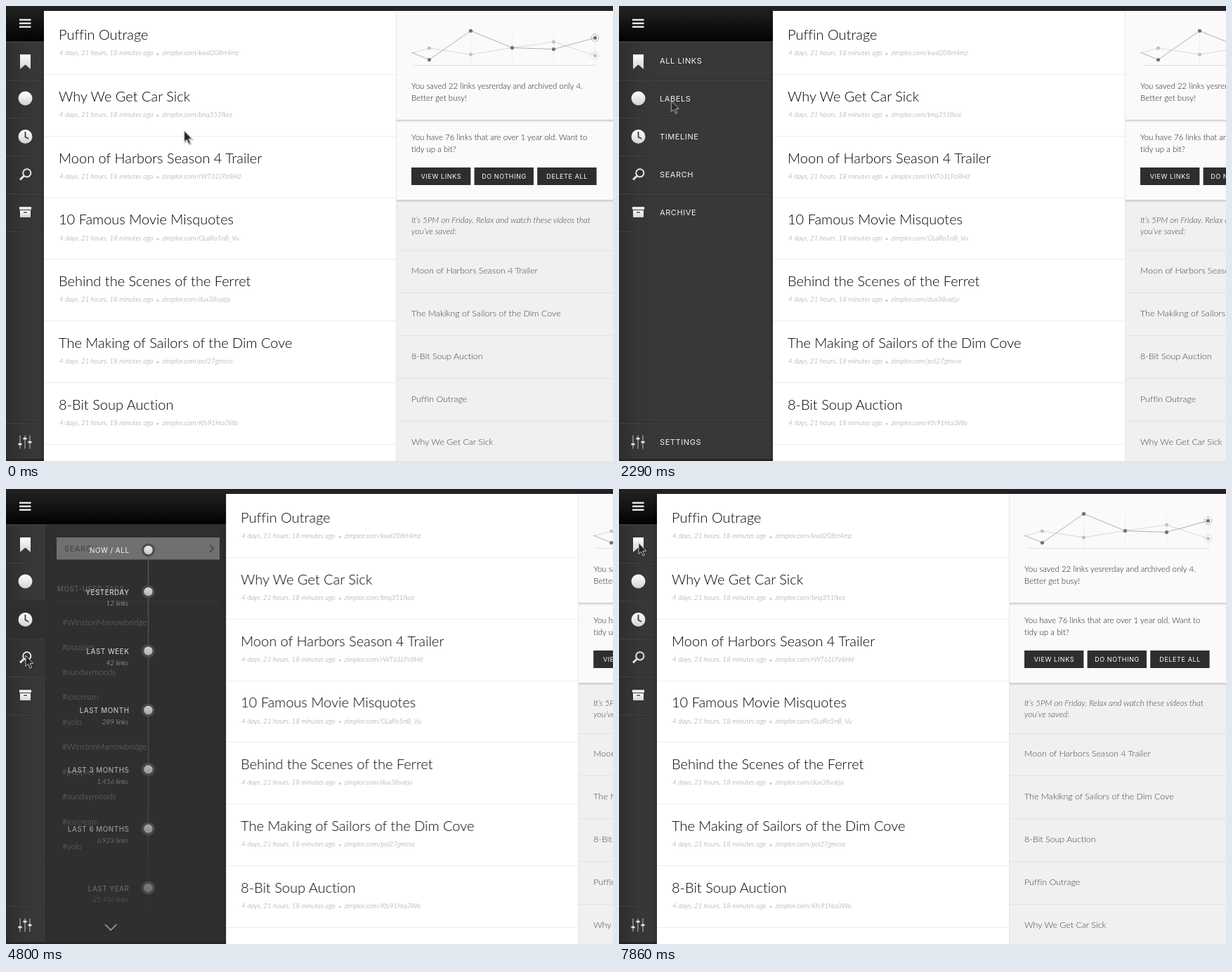
An HTML page for the animation above (9350 ms loop, 864x648 px).

```html
<!DOCTYPE html>
<html lang="en">
<head>
<meta charset="utf-8">
<title>Link reader</title>
<style>
html, body { margin: 0; width: 100%; height: 100%; overflow: hidden; background: #383838; }
svg { display: block; width: 864px; height: 648px; }
text { font-family: Lato, sans-serif; font-weight: 300; font-size: 11.7px; font-variant-ligatures: none; }
.caps { font-family: Inter, sans-serif; font-weight: 500; font-size: 9.8px; letter-spacing: .55px; }
.label { font-weight: 400; font-size: 11px; letter-spacing: .6px; fill: #f2f2f2; }
.title { font-size: 20px; fill: #000; }
.meta { font-size: 9.8px; font-style: italic; fill: #949494; }
.body { font-size: 11.5px; fill: #222; }
.hint { font-size: 11.8px; font-style: italic; fill: #444; }
.pick { font-size: 12.45px; fill: #444; }
.btn { font-weight: 400; font-size: 9px; letter-spacing: .6px; fill: #fff; text-anchor: middle; }
.end { text-anchor: end; }
.count { font-size: 9.9px; font-style: italic; fill: #f0f0f0; }
.item { fill: #fff; }
.move { animation: 9350ms linear infinite; }
#panel { animation-name: slide; }
#cursor { animation-name: point; }
#labels { animation-name: labels; }
#column { animation-name: column; }
#timeline { animation-name: timeline; }
#search { animation-name: search; }
#account { animation-name: account; }
#accountRow { animation-name: accountRow; }
@keyframes slide {
  0%, 7.38% { transform: translateX(0); }
  11.23%, 37.54% { transform: translateX(165px); }
  41.39%, 48.45% { transform: translateX(182px); }
  51.66%, 80.21% { transform: translateX(267.5px); }
  84.06%, 100% { transform: translateX(0); }
}
@keyframes point {
  0% { transform: translate(254px, 178px); }
  6.74% { transform: translate(27px, 25px); }
  18.72% { transform: translate(27px, 25px); animation-timing-function: cubic-bezier(.5, 0, .85, .6); }
  24.49% { transform: translate(74px, 133px); }
  27.38%, 32.09% { transform: translate(184px, 605px); }
  37.22%, 43.64% { transform: translate(28px, 184px); }
  46.84%, 57.43% { transform: translate(28px, 237px); }
  63.85%, 73.37% { transform: translate(28px, 616px); }
  79.47%, 100% { transform: translate(28px, 77px); }
}
@keyframes labels {
  0%, 37.54% { opacity: 1; }
  41.39%, 84.06% { opacity: 0; }
  84.07%, 100% { opacity: 1; }
}
@keyframes column {
  0%, 37.54% { opacity: 0; }
  41.39%, 84.06% { opacity: 1; }
  84.07%, 100% { opacity: 0; }
}
@keyframes timeline {
  0%, 37.54% { opacity: 0; }
  41.39%, 51.02% { opacity: 1; }
  54.22%, 100% { opacity: 0; }
}
@keyframes search {
  0%, 50.05% { opacity: 0; }
  54.22%, 64.49% { opacity: 1; }
  68.34%, 100% { opacity: 0; }
}
@keyframes account {
  0%, 64.49% { opacity: 0; }
  68.34%, 84.06% { opacity: 1; }
  84.07%, 100% { opacity: 0; }
}
@keyframes accountRow {
  0%, 80.21% { opacity: 1; }
  84.06%, 100% { opacity: 0; }
}
</style>
</head>
<body>
<svg id="stage" viewBox="0 0 864 648">
  <defs>
    <linearGradient id="head" x2="0" y2="1">
      <stop stop-color="#222"/><stop offset=".3" stop-color="#1a1a1a"/><stop offset="1" stop-color="#020202"/>
    </linearGradient>
    <linearGradient id="side" gradientUnits="userSpaceOnUse" x1="0" x2="54">
      <stop stop-color="#2e2e2e"/><stop offset=".5" stop-color="#363636"/><stop offset="1" stop-color="#383838"/>
    </linearGradient>
    <linearGradient id="edge"><stop stop-opacity="0"/><stop offset="1" stop-opacity=".12"/></linearGradient>
    <linearGradient id="drop" x2="0" y2="1"><stop stop-opacity=".12"/><stop offset="1" stop-opacity="0"/></linearGradient>
    <linearGradient id="icon" x2="0" y2="1"><stop stop-color="#fff"/><stop offset="1" stop-color="#d2d2d2"/></linearGradient>
    <linearGradient id="trail" gradientUnits="userSpaceOnUse" x1="0" x2="0" y1="87" y2="626">
      <stop stop-color="#5c5c5c"/><stop offset=".6" stop-color="#4c4c4c"/><stop offset="1" stop-color="#2f2f2f"/>
    </linearGradient>
  </defs>
</svg>
<script>
const el = (tag, attrs, inner = '') =>
  `<${tag} ${Object.entries(attrs).map(([k, v]) => `${k}="${v}"`).join(' ')}>${inner}</${tag}>`;
const text = (x, y, s, cls, more) => el('text', { x, y, class: cls, ...more }, s);
const rect = (x, y, width, height, fill, more) => el('rect', { x, y, width, height, fill, ...more });
const dot = (cx, cy, r, fill, more) => el('circle', { cx, cy, r, fill, ...more });
const path = (d, stroke, width = 1, fill = 'none') => el('path', { d, stroke, 'stroke-width': width, fill });
const hline = (x, y, w, color) => rect(x, y, w, 1, color);
const group = (id, ...parts) => el('g', { id, class: 'move' }, parts.join(''));
const each = (list, fn) => list.map(fn).join('');

const rowTops = [50, 104, 158, 212, 266, 320, 593];

function sidebar() {
  return rect(0, 0, 864, 648, 'url(#side)') + rect(0, 0, 864, 50, 'url(#head)') +
    each(rowTops, y => hline(0, y, 864, '#2f2f2f') + hline(0, y + 1, 864, '#424242')) +
    rect(0, 645, 864, 3, '#2b2326');
}

function icons() {
  const fill = 'url(#icon)';
  return each([18.5, 23.5, 28.5], y => rect(19, y, 16.5, 2.4, '#ececec')) +
    path('M20 69H35V90L27.5 83.5L20 90Z', 'none', 0, fill) +
    dot(27.5, 131.5, 10, fill) +
    dot(27.5, 186, 10, fill) + path('M27.5 179V186.5L32 189', '#383838', 1.8) +
    dot(29.8, 237.8, 5.6, 'none', { stroke: '#e6e6e6', 'stroke-width': 2 }) +
    path('M25.5 242L20 247.3', '#e0e0e0', 3) +
    rect(19, 286, 17, 4, '#e8e8e8') + rect(20, 291, 15, 10, fill) + rect(25, 293, 5, 1.6, '#555') +
    each([[20, 624], [27, 616], [34, 621]], ([x, y]) =>
      rect(x - .5, 611.5, 1, 19, '#c4c4c4') + rect(x - 2.5, y - 1.2, 5, 2.6, '#e8e8e8'));
}

function labels() {
  const names = ['ALL LINKS', 'LABELS', 'TIMELINE', 'SEARCH', 'ARCHIVE'];
  return each(names, (s, i) => text(58, 82 + 54 * i, s, 'caps label')) +
    text(58, 624.5, 'SETTINGS', 'caps label');
}

const activeRow = y => rect(0, y, 55, 53, '#2f2f2f');

function timeline() {
  const rows = [['NOW / ALL', '', 1], ['YESTERDAY', '12', .9], ['LAST WEEK', '42', .87], ['LAST MONTH', '289', .8],
    ['LAST 3 MONTHS', '1,456', .68], ['LAST 6 MONTHS', '6,923', .58], ['LAST YEAR', '25,456', .32]];
  return activeRow(159) + rect(201.8, 87, 1.4, 539, 'url(#trail)') + each(rows, ([name, n, alpha], i) => {
    const y = i ? 146.2 + 84.4 * (i - 1) : 87;
    return dot(202.5, y, 9.6, '#4b4b4b') +
      el('g', { opacity: alpha },
        dot(202.5, y, 6.2, 'url(#icon)') +
        text(175.5, y + 4.4, name, 'caps end', { fill: '#f4f4f4' }) +
        (n && text(174, y + 20.2, n + ' links', 'count end')));
  }) + path('M141 620L149.2 628.3L157.4 620', '#bdbdbd', 1.4);
}

function search() {
  const tags = ['#WinstonMarrowbridge', '#puppies', '#sundaymoods', '#icecream', '#yolo'];
  return activeRow(213) + rect(72, 69, 232, 31.5, '#fff') +
    text(83, 89, 'SEARCH', 'caps label', { style: 'fill:#6a6a6a' }) +
    path('M290 79.5L295.5 84.7L290 90', '#555', 1.4) +
    text(73, 146, 'MOST-USED TAGS', 'caps', { fill: '#bbb' }) + hline(72, 159, 232, '#484848') +
    each([...tags, ...tags], (s, i) => text(80, 194 + 35.45 * i, s, 'item'));
}

function account() {
  const own = ['Change Password', 'Change Email Address', 'Import or Export Marks', 'Invite Others'];
  const help = ['How to Use Orlet', 'FAQ', 'Get the Bookmarklet'];
  return el('g', { id: 'accountRow', class: 'move' }, activeRow(594.5)) +
    rect(71.5, 68, 232.5, 36.5, '#ee5656') +
    text(188, 89.4, 'SIGN OUT', 'caps label', { 'text-anchor': 'middle', style: 'letter-spacing:1px;fill:#fde4e4' }) +
    text(73, 155.3, 'ACCOUNT', 'caps', { fill: '#dedede' }) +
    text(136, 155.2, '{ sam.poe@tobrin.it }', 'count', { style: 'fill:#fff' }) + hline(72, 168, 232, '#464646') +
    each(own, (s, i) => text(79.5, 203.2 + 32.1 * i, s, 'item')) +
    text(73, 352.4, 'HELP', 'caps', { fill: '#c8c8c8' }) + hline(72, 364, 232, '#464646') +
    each(help, (s, i) => text(79.5, 400 + 35.4 * i, s, 'item'));
}

function links() {
  const rows = [['Puffin Outrage', 'kwd208rt4mz'], ['Why We Get Car Sick', 'bnq351fkce'],
    ['Moon of Harbors Season 4 Trailer', 'rWT61LPz8Hd'], ['10 Famous Movie Misquotes', 'GLaRo5nB_Vu'],
    ['Behind the Scenes of the Ferret', 'dux38vatjo'], ['The Making of Sailors of the Dim Cove', 'pol27gmcse'],
    ['8-Bit Soup Auction', 'Kfs91hta3Wo'], ['The Common Saffron Bid', '']];
  return each(rows, ([title, id], i) => {
    const y = 87.75 * i;
    return text(75, 48 + y, title, 'title') + (id &&
      text(76, 70.3 + y, '4 days, 21 hours, 18 minutes ago', 'meta') + dot(216, 68.5 + y, 1.5, '#c4c4c4') +
      text(222.5, 70.3 + y, 'zimplor.com/' + id, 'meta') + hline(54, Math.round(97 + y), 501, '#ededed'));
  });
}

function chart() {
  const xs = [602.5, 661.5, 720.5, 779.5, 838.5];
  const series = (ys, first, line, mark) =>
    path(`M577 ${first}` + each(ys, (y, i) => `L${xs[i]} ${y}`), line) +
    each(ys, (y, i) => dot(xs[i], y, 2.6, mark)) +
    dot(xs[4], ys[4], 5.3, 'none', { stroke: line, 'stroke-width': .9 });
  return each(xs.slice(1), x => rect(x - .5, 36, 1, 48, '#f0eef0')) + hline(581, 84, 259, '#dedede') +
    series([60, 69, 59.5, 51, 70.5], 67, '#dadada', '#c3c3c3') +
    series([76.5, 35.3, 59.5, 61.5, 45.3], 66, '#b0b0b0', '#737373');
}

function aside() {
  const picks = ['Moon of Harbors Season 4 Trailer', 'The Makikng of Sailors of the Dim Cove',
    '8-Bit Soup Auction', 'Puffin Outrage', 'Why We Get Car Sick'];
  const x = 577;
  return rect(555, 7, 309, 641, '#f0f0f0') + rect(555, 7, 309, 269, '#fbf9fb') +
    each([162, 276], y => hline(555, y, 309, '#c9c9c9') + rect(555, y + 1, 309, 3, 'url(#drop)')) +
    rect(555, 7, 1, 641, '#e6e6e6') + chart() +
    text(x, 118.2, 'You saved 22 links yesrerday and archived only 4.', 'body') +
    text(x, 135.2, 'Better get busy!', 'body') +
    text(x, 190.8, 'You have 76 links that are over 1 year old. Want to', 'body') +
    text(x, 207.6, 'tidy up a bit?', 'body') +
    each(['VIEW LINKS', 'DO NOTHING', 'DELETE ALL'], (s, i) =>
      rect(x + 89.6 * i, 230, 84.4, 25, '#2e2e30') + text(x + 42.4 + 89.6 * i, 246, s, 'caps btn')) +
    text(x, 308.8, 'It’s 5PM on Friday. Relax and watch these videos that', 'hint') +
    text(x, 325.2, 'you’ve saved:', 'hint') +
    each(picks, (s, i) => hline(555, Math.round(347.6 + 60.8 * i), 309, '#e2e2e2') +
      text(x, 381.4 + 60.8 * i, s, 'pick'));
}

const panel = rect(48, 7, 6, 641, 'url(#edge)') + rect(54, 0, 810, 7, '#232223') +
  rect(54, 7, 501, 641, '#fff') + links() + aside();

const arrow = 'M0 0V15.6L3.6 12.3L6.2 18.4L8.7 17.3L6.1 11.4H10.8Z';
const cursor = el('g', { transform: 'translate(1 1.2)', opacity: .25 }, path(arrow, '#000', 1.5, '#000')) +
  path(arrow, '#d4d4d4', .9, '#242424');

document.getElementById('stage').insertAdjacentHTML('beforeend',
  sidebar() + group('labels', labels()) +
  group('column', rect(55, 51, 809, 594, '#2f2f2f'), rect(54, 51, 1, 594, '#3f3f3f')) +
  group('search', search()) + group('timeline', timeline()) + group('account', account()) +
  icons() + group('panel', panel) + group('cursor', cursor));
</script>
</body>
</html>
```
